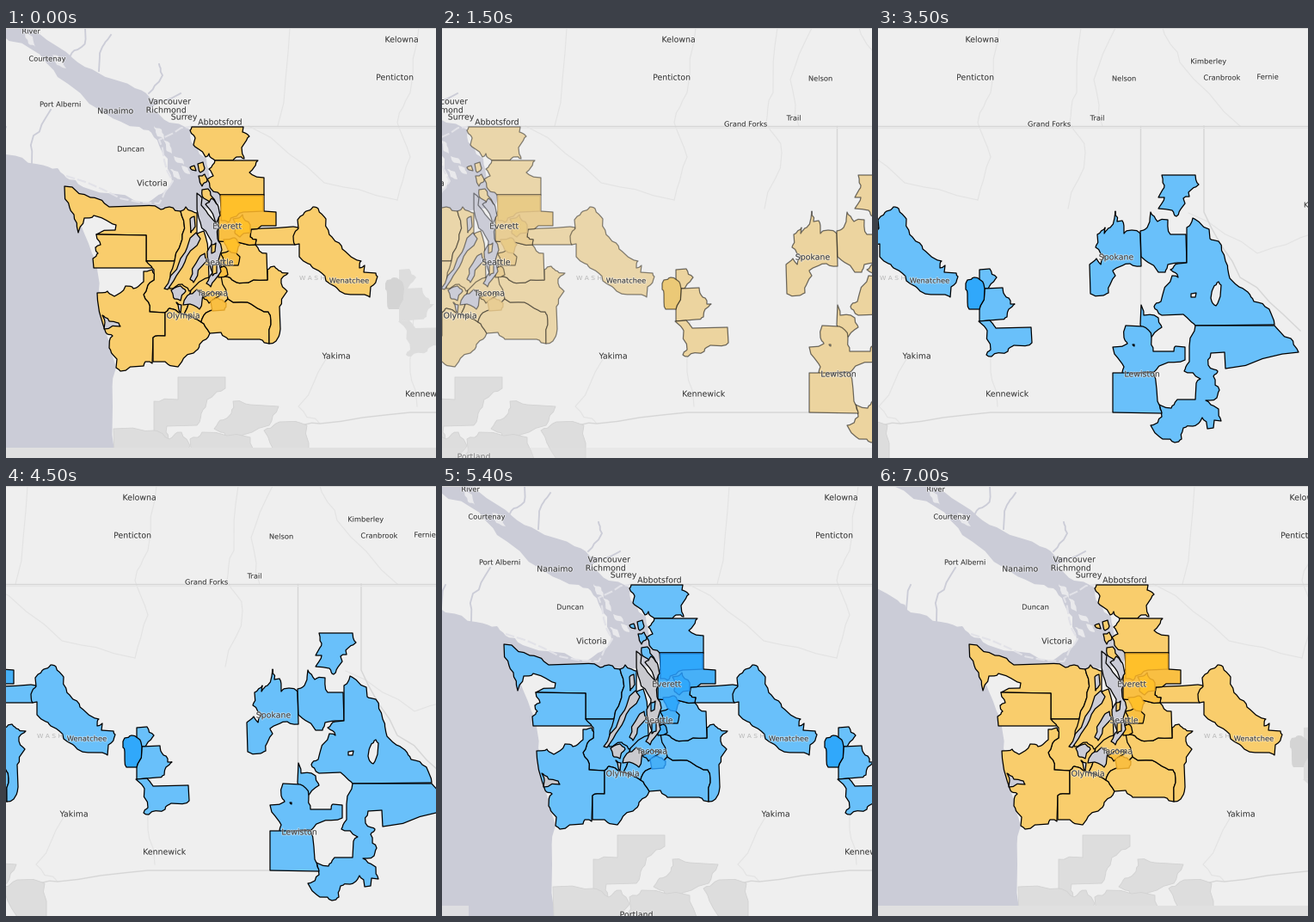
A matplotlib script that plays this animation: 500 by 500 pixels, repeating every 7.1 s.

```python
import math

import numpy as np
import matplotlib.pyplot as plt
import matplotlib.patheffects as pe
from matplotlib.animation import FuncAnimation
from matplotlib.colors import to_rgb
from matplotlib.patches import Polygon, Rectangle

SIZE = 500
FRAMES, STEP = 71, 100
EAST = 339          # pan distance to the eastern view
REST = 38           # western view after the way back

LAND, WATER, GREY = "#efefef", "#cbccd7", "#dddddd"


def shades(*names):
    return [np.array(to_rgb(c)) for c in names]


# fill by state (idle, yellow, blue) for one, two and three stacked areas
FILLS = [shades(GREY, "#f9cd6c", "#69c0fa"),
         shades("#d9d9d9", "#f9bf42", "#47b0f7"),
         shades("#d4d4d4", "#ffc02a", "#30a8fb")]
INNER_EDGE = shades("#cfcfcf", "#e0a125", "#2488dc")
SOUND = shades(WATER, WATER, "#c9c9ce")

fig = plt.figure(figsize=(5, 5), dpi=100, facecolor=LAND)
ax = fig.add_axes([0, 0, 1, 1])
ax.set_ylim(SIZE, 0)
ax.axis("off")


def bend(a, b, depth):
    """Points from a up to b; slanted edges get small bends that
    come out the same from either side, so shared edges match."""
    dx, dy = b[0] - a[0], b[1] - a[1]
    if depth == 0 or min(abs(dx), abs(dy)) < 1.5:
        return [a]
    size = min(0.13 * math.hypot(dx, dy), 2.6)
    s = a[0] + b[0] + 1.7 * (a[1] + b[1])
    mid = ((a[0] + b[0]) / 2 + size * math.sin(s * 3.1),
           (a[1] + b[1]) / 2 + size * math.sin(s * 5.3))
    return bend(a, mid, depth - 1) + bend(mid, b, depth - 1)


def rough(pts, closed=True):
    ends = pts[1:] + (pts[:1] if closed else pts[:0])
    out = [p for a, b in zip(pts, ends) for p in bend(a, b, 2)]
    return out if closed else out + [pts[-1]]


def area(pts, face, z, edge="none", lw=0.9):
    return ax.add_patch(Polygon(rough(pts), facecolor=face, edgecolor=edge,
                                lw=lw, zorder=z, joinstyle="round"))


def line(color, lw, *pts, style="-"):
    xs, ys = zip(*rough(pts, closed=False))
    ax.plot(xs, ys, color=color, lw=lw, ls=style, zorder=2)


# ---- base map ----
area([(-45, 116), (-15, 133), (0, 147), (35, 158), (60, 163), (70, 174),
      (90, 185), (150, 201), (165, 203), (185, 190), (193, 178), (188, 152),
      (172, 127), (155, 115), (112, 97), (60, 57), (30, 25), (-20, 0),
      (30, 0), (70, 28), (100, 48), (150, 70), (180, 85), (170, 92),
      (190, 110), (214, 118), (219, 136), (233, 152), (236, 170), (249, 194),
      (246, 208), (203, 213), (150, 207), (120, 208), (98, 197), (68, 184),
      (75, 210), (100, 262), (108, 305), (116, 354), (128, 395), (124, 440),
      (126, 501), (-45, 501)], WATER, 1)


def isle(x, y, w, h):
    area([(x - w, y - h), (x + w / 2, y - h / 2), (x + w, y + h),
          (x - w / 3, y + h / 2)], "#e9e9ec", 2)


isle(201, 154, 6, 5)
isle(209, 165, 5, 5)
isle(197, 170, 6, 6)
isle(188, 138, 5, 8)
isle(178, 122, 6, 8)
isle(28, 14, 6, 8)
isle(62, 39, 8, 8)

for inlet in (((30, 158), (32, 125), (52, 95)), ((-5, 143), (0, 115)),
              ((75, 32), (88, 22), (92, 0)), ((108, 50), (112, 22), (122, 8)),
              ((166, 76), (182, 55), (178, 42)), ((176, 84), (203, 76))):
    line(WATER, 1.3, *inlet)
for river in (((575, 0), (570, 75), (562, 110), (580, 145), (560, 210)),
              ((480, 0), (470, 75), (455, 110), (470, 150), (455, 200)),
              ((615, 0), (590, 60), (600, 114)),
              ((670, 0), (690, 40), (760, 114)),
              ((474, 330), (470, 400), (478, 440)),
              ((282, 114), (370, 180), (455, 200)),
              ((330, 0), (316, 114)),
              ((365, 460), (340, 440), (372, 385)),
              ((700, 215), (780, 262), (842, 240))):
    line("#e3e3e3", 0.8, *river)
for border in (((214, 114), (842, 114)), ((644, 114), (644, 447)),
               ((718, 114), (718, 214), (760, 290), (830, 352)),
               ((318, 470), (365, 460), (470, 447), (644, 447))):
    line("#d6d6d6", 1, *border)
line("#e6e6e6", 0.8, (214, 116), (842, 116))
line("#e2e2e8", 1.5, (70, 172), (158, 203), (178, 204), (194, 178),
     (178, 130), (214, 115), style=(0, (5, 1.5)))


def town(*pts):
    area(pts, GREY, 2, "#d2d2d2", 0.6)


town((200, 406), (255, 406), (255, 419), (234, 432), (229, 444), (222, 462),
     (187, 463), (189, 478), (172, 477), (172, 434), (200, 432))
town((125, 466), (172, 468), (190, 478), (204, 470), (214, 486), (200, 501),
     (126, 501))
town((249, 456), (262, 448), (264, 434), (284, 438), (317, 440), (306, 462),
     (262, 480), (242, 466))
town((300, 468), (318, 458), (350, 462), (352, 501), (318, 501))
town((214, 478), (228, 470), (284, 476), (292, 501), (212, 501))

ax.text(341, 291, "W A S H", fontsize=5.4, color="#b9b9b9", zorder=7,
        family="DejaVu Sans", va="center", clip_on=True)

# ---- coloured areas ----
west, east, inner, sound, gaps = [], [], [], [], []


def region(level, *pts, z=3):
    west.append((area(pts, LAND, z), level))


def spot(level, *pts):
    inner.append((area(pts, LAND, 3.5), level))


def channel(*pts):
    sound.append(area(pts, WATER, 4))


def far(level, *pts):
    """Eastern area, measured in the eastern view."""
    east.append((area([(x + EAST, y) for x, y in pts], LAND, 3), level))


def gap(*pts):
    gaps.append(area([(x + EAST, y) for x, y in pts], LAND, 4))


region(0, (216, 115), (276, 115), (275, 121), (283, 126), (274, 139),
       (277, 152), (268, 150), (264, 154), (243, 154), (236, 146), (232, 150),
       (218, 136), (220, 128), (214, 119))
region(0, (243, 154), (293, 154), (283, 168), (300, 174), (300, 194),
       (249, 194), (237, 185), (234, 176), (241, 172), (236, 164))
region(0, (68, 184), (77, 185), (98, 197), (120, 208), (150, 207), (180, 211),
       (190, 208), (203, 213), (205, 240), (196, 271), (163, 271), (163, 241),
       (105, 240), (127, 235), (128, 229), (102, 218), (91, 221), (84, 238),
       (79, 217), (74, 209))
region(0, (105, 240), (163, 241), (163, 271), (172, 272), (169, 279),
       (102, 279), (101, 268), (107, 262), (104, 255), (110, 252))
region(0, (163, 271), (196, 271), (215, 305), (207, 333), (190, 326),
       (185, 331), (167, 330), (160, 310), (172, 293), (172, 281))
region(0, (203, 213), (209, 208), (222, 215), (222, 240), (230, 236),
       (235, 262), (236, 290), (213, 306), (205, 298), (190, 303), (196, 271),
       (205, 240))
region(0, (106, 308), (118, 306), (126, 312), (139, 300), (148, 303),
       (160, 295), (160, 283), (170, 281), (172, 293), (160, 310), (167, 330),
       (185, 331), (185, 358), (171, 360), (170, 390), (162, 388), (160, 393),
       (133, 399), (128, 395), (129, 385), (120, 372), (124, 358), (116, 354))
region(0, (185, 331), (190, 326), (207, 333), (227, 342), (237, 355),
       (225, 368), (218, 378), (200, 394), (185, 388), (171, 388), (171, 360),
       (185, 358))
region(0, (207, 333), (215, 305), (236, 290), (250, 288), (263, 293),
       (258, 315), (237, 329), (227, 342))
region(0, (258, 315), (285, 321), (305, 330), (308, 340), (306, 367),
       (295, 362), (258, 362), (250, 354), (237, 355), (227, 342), (237, 329))
region(0, (250, 288), (263, 293), (282, 296), (304, 293), (304, 281),
       (312, 277), (317, 282), (328, 285), (320, 292), (327, 306), (318, 324),
       (319, 350), (314, 364), (306, 367), (308, 340), (305, 330), (285, 321),
       (258, 315))
region(0, (247, 248), (290, 252), (303, 262), (304, 293), (282, 296),
       (263, 293), (250, 288), (247, 270))
region(0, (285, 234), (298, 233), (334, 231), (340, 232), (336, 252),
       (290, 252), (291, 246), (284, 243))
region(1, (249, 194), (300, 194), (300, 213), (314, 214), (314, 230),
       (285, 234), (284, 243), (291, 246), (290, 252), (247, 248), (247, 225))
region(0, (357, 208), (363, 210), (372, 222), (379, 243), (391, 257),
       (413, 271), (411, 279), (417, 276), (416, 284), (430, 285), (432, 289),
       (424, 301), (423, 313), (417, 310), (388, 306), (372, 294), (357, 279),
       (354, 275), (341, 266), (341, 251), (336, 252), (334, 242), (340, 233),
       (339, 223), (349, 213))
region(0, (224, 172), (231, 170), (234, 178), (228, 184))
region(0, (228, 188), (235, 187), (246, 207), (244, 214), (230, 198))
region(0, (214, 162), (219, 160), (221, 166))
region(0, (223, 158), (229, 156), (231, 163), (226, 168))
region(1, (250, 262), (259, 259), (272, 266), (270, 276), (253, 276))
region(1, (247, 280), (253, 277), (258, 287), (247, 290))
region(1, (229, 313), (240, 306), (250, 309), (236, 320))
region(0, (239, 252), (244, 250), (243, 260), (239, 262), z=4.5)
region(0, (240, 276), (245, 275), (245, 285), (240, 288), z=4.5)

spot(2, (250, 195), (299, 195), (299, 213), (276, 214), (268, 219),
     (258, 226), (250, 224))
spot(2, (264, 222), (275, 217), (284, 229), (284, 238), (272, 243), (266, 238))
spot(2, (253, 246), (266, 244), (272, 252), (268, 262), (258, 258))
spot(1, (238, 318), (246, 314), (256, 320), (254, 328), (240, 329))

channel((222, 192), (228, 197), (227, 206), (248, 232), (246, 245), (251, 258),
        (247, 270), (250, 283), (238, 301), (233, 297), (240, 285), (234, 260),
        (239, 248), (226, 226))
channel((221, 238), (226, 245), (208, 272), (188, 304), (184, 303), (203, 268))
channel((239, 198), (247, 208), (249, 218), (244, 227), (232, 205))
channel((211, 311), (222, 304), (229, 309), (225, 327), (214, 321), (206, 322))
channel((224, 268), (231, 262), (234, 270), (218, 296), (214, 292))
channel((192, 305), (203, 300), (209, 306), (203, 317), (196, 315))
channel((198, 319), (204, 322), (203, 331))
channel((112, 334), (120, 341), (131, 343), (133, 347), (114, 350))
channel((214, 222), (219, 219), (220, 231), (215, 238))

far(0, (118, 293), (118, 281), (130, 280), (138, 290), (128, 303), (124, 303),
    (119, 297))
far(0, (124, 303), (145, 302), (147, 310), (154, 321), (159, 321), (152, 327),
    (150, 336), (141, 339), (118, 341), (118, 327))
far(2, (104, 293), (112, 290), (119, 293), (124, 303), (118, 327), (106, 327),
    (104, 309), (102, 304))
far(0, (117, 341), (130, 340), (137, 349), (178, 348), (179, 366), (158, 369),
    (151, 376), (132, 382), (126, 380), (131, 374), (127, 352))
far(0, (330, 171), (369, 171), (373, 182), (361, 191), (362, 196), (355, 198),
    (357, 204), (347, 219), (342, 212), (326, 210), (333, 197), (326, 197),
    (333, 183))
far(0, (276, 213), (278, 225), (284, 224), (286, 239), (295, 235), (305, 239),
    (306, 277), (293, 274), (273, 282), (276, 288), (268, 308), (262, 311),
    (247, 309), (246, 275), (254, 268), (259, 275), (263, 266), (253, 255),
    (255, 240), (264, 232), (263, 239), (270, 232))
far(0, (305, 236), (313, 232), (317, 214), (325, 225), (337, 223), (340, 240),
    (358, 240), (359, 273), (348, 273), (337, 275), (334, 284), (326, 284),
    (306, 266))
far(0, (359, 232), (366, 221), (385, 234), (386, 245), (396, 248), (404, 271),
    (409, 291), (430, 307), (437, 318), (450, 324), (461, 345), (369, 346),
    (355, 333), (330, 334), (321, 324), (329, 318), (342, 288), (349, 290),
    (340, 281), (349, 274), (359, 273))
far(0, (369, 346), (461, 346), (480, 361), (489, 377), (404, 396), (403, 377),
    (387, 378), (384, 392), (395, 399), (390, 405), (397, 421), (394, 430),
    (381, 433), (396, 443), (399, 457), (391, 456), (390, 465), (383, 466),
    (377, 453), (366, 463), (355, 465), (353, 478), (345, 482), (331, 478),
    (317, 462), (330, 452), (325, 437), (341, 442), (348, 432), (369, 432),
    (370, 413), (375, 408), (356, 399), (362, 388), (362, 370))
far(0, (306, 322), (309, 334), (326, 337), (330, 348), (316, 361), (305, 345))
far(0, (273, 371), (290, 367), (286, 360), (288, 346), (308, 347), (318, 360),
    (320, 376), (344, 376), (346, 370), (357, 371), (357, 386), (327, 393),
    (321, 400), (310, 400), (284, 405), (286, 394))
far(0, (273, 401), (320, 401), (325, 434), (330, 448), (273, 447))

gap((396, 295), (399, 299), (398, 312), (393, 323), (387, 314), (390, 302))
gap((364, 309), (370, 308), (369, 313), (364, 313))
gap((296, 368), (298, 368), (298, 370))

# ---- labels ----
halo = [pe.withStroke(linewidth=1.4, foreground=(1, 1, 1, 0.45))]


def label(name, x, y, px=9.4):
    ax.text(x, y, name, fontsize=px * 0.72, family="DejaVu Sans",
            color="#454545", ha="center", va="center_baseline", zorder=8,
            clip_on=True, path_effects=halo)


for big in (("Nanaimo", 127, 96), ("Vancouver", 190, 85), ("Surrey", 207, 103),
            ("Richmond", 186, 95), ("Abbotsford", 249, 109),
            ("Victoria", 170, 180), ("Everett", 257, 230),
            ("Seattle", 248, 272), ("Tacoma", 240, 308), ("Olympia", 206, 334),
            ("Yakima", 384, 381), ("Kennewick", 489, 425),
            ("Kelowna", 460, 13), ("Penticton", 452, 57),
            ("Spokane", 616, 266), ("Lewiston", 646, 402),
            ("Portland", 222, 498)):
    label(*big)
for small in (("River", 29, 3), ("Courtenay", 48, 35), ("Duncan", 145, 140),
              ("Port Alberni", 63, 88), ("Wenatchee", 399, 293),
              ("Nelson", 625, 58), ("Grand Forks", 538, 111),
              ("Trail", 594, 104), ("Fernie", 792, 56),
              ("Kimberley", 723, 38), ("Cranbrook", 739, 57),
              ("Kalispell", 851, 205)):
    label(*small, px=8.3)

# unloaded strip along the bottom, and the top rule
ax.add_patch(Rectangle((-45, 488), 72, 13, color="#dedee1", lw=0, zorder=9))
strip = ax.add_patch(Rectangle((0, 0), 1, 12 / SIZE, color="#e0e0e0", lw=0,
                               transform=ax.transAxes, zorder=10))
ax.add_patch(Rectangle((0, 1 - 1 / SIZE), 1, 1 / SIZE, color="#d4d4d4", lw=0,
                       transform=ax.transAxes, zorder=10))

# ---- motion ----
IDLE, YELLOW, BLUE = np.eye(3)


def ramp(i, start, steps):
    return min(max((i - start + 1) / steps, 0), 1)


def mix(a, b, t):
    return a + (b - a) * t


def blend(weights, colors):
    return sum(w * c for w, c in zip(weights, colors))


def state(i):
    go, tint = ramp(i, 10, 11), ramp(i, 30, 6)
    back, reset = ramp(i, 45, 11), ramp(i, 65, 6)
    offset = -EAST * go + (EAST + REST) * back
    w = mix(mix(mix(YELLOW, IDLE, go), BLUE, tint), YELLOW, reset)
    e = mix(mix(mix(IDLE, YELLOW, go), BLUE, tint), IDLE, reset)
    return round(offset), w, e, max(1 - go, reset)


def paint(shapes, weights):
    for patch, level in shapes:
        patch.set_facecolor(blend(weights, FILLS[level]))
        patch.set_edgecolor((0, 0, 0, 1 - weights[0]))


def draw(i):
    offset, w, e, cover = state(i)
    ax.set_xlim(-offset, SIZE - offset)
    paint(west, w)
    paint(east, e)
    for patch, level in inner:
        patch.set_facecolor(blend(w, FILLS[level]))
        patch.set_edgecolor(blend(w, INNER_EDGE))
    for patch in sound:
        patch.set_facecolor(blend(w, SOUND))
        patch.set_edgecolor((0, 0, 0, 1 - w[0]))
    for patch in gaps:
        patch.set_edgecolor((0, 0, 0, 1 - e[0]))
    strip.set_alpha(cover)
    return []


anim = FuncAnimation(fig, draw, frames=FRAMES, interval=STEP, repeat=True,
                     repeat_delay=0, init_func=lambda: draw(0), blit=False)
plt.show()
```
